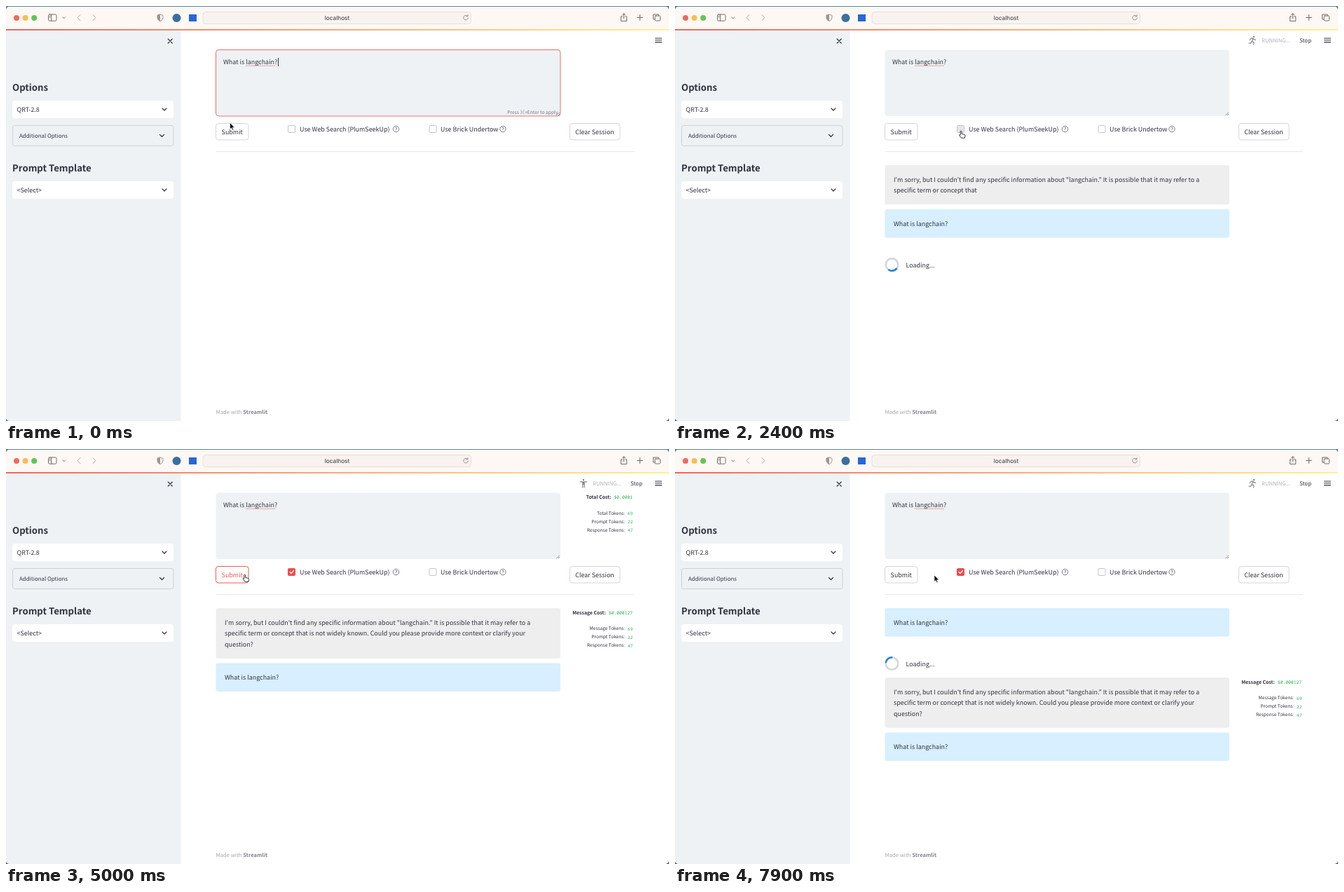
These frames come from a looping animation (946 by 592 pixels, 8000 ms). An HTML page:

```html
<!DOCTYPE html>
<html lang="en">
<head>
<meta charset="utf-8">
<title>Chat demo</title>
<style>
  html, body { margin: 0; width: 100%; height: 100%; overflow: hidden; background: #55575c; }
  svg { display: block; width: 946px; height: 592px; }
  text {
    font: 8.95px "Noto Sans CJK SC", "Noto Sans CJK JP", "Noto Sans", sans-serif;
    fill: #31333f; text-rendering: geometricPrecision; white-space: pre;
  }
  text.head { font-size: 13.2px; font-weight: 600; }
  text.small { font-size: 7.9px; }
  text.tiny { font-size: 6.5px; }
  text.cost { font-size: 6.9px; font-weight: 700; }
  text.code { font: 6.3px "Noto Sans Mono", "DejaVu Sans Mono", monospace; fill: #27b150; }
  text.mid { text-anchor: middle; }
  text.end { text-anchor: end; }
  .line { fill: none; stroke: #31333f; stroke-width: 1.2; stroke-linecap: round; stroke-linejoin: round; }
  .tool { fill: none; stroke: #706d6a; stroke-width: 1; stroke-linecap: round; stroke-linejoin: round; }
  .btn { fill: #fff; stroke: #d6d6d9; }
  .hover .btn { stroke: #ec5a55; }
  .hover text { fill: #ec5a55; }
  .box { fill: #fff; stroke: #c3c4c9; }
  .blue { fill: #d7effe; }
  .gray { fill: #eee; }
</style>
</head>
<body>
<svg viewBox="0 0 946 592">
  <defs>
    <linearGradient id="bar"><stop stop-color="#f4534e"/><stop offset="1" stop-color="#fdf08a"/></linearGradient>
    <clipPath id="win"><rect y="1" width="946" height="591" rx="5"/></clipPath>
    <g id="down"><path class="line" d="M-3-1.5L0 1.5L3-1.5"/></g>
    <g id="help"><circle r="4.2" fill="none" stroke="#6a6c76" stroke-width=".9"/><text class="tiny mid" y="2.4">?</text></g>
    <g id="question"><rect class="blue" x="299.5" width="491.5" height="40.5" rx="3"/><text x="312" y="23.7">What is langchain?</text></g>
  </defs>
  <rect width="946" height="2" fill="#5d8498"/>
  <g clip-path="url(#win)">
    <rect width="946" height="592" fill="#fff"/>
    <rect y="1" width="946" height="33" fill="#fdf8f4"/>
    <rect y="35" width="249.5" height="557" fill="#eef2f5"/>
    <rect y="33" width="946" height="1.8" fill="url(#bar)"/>

    <!-- browser toolbar -->
    <circle cx="15" cy="17" r="4" fill="#ed6a5f"/>
    <circle cx="27.6" cy="17" r="4" fill="#f5bf4f"/>
    <circle cx="40.2" cy="17" r="4" fill="#61c554"/>
    <rect class="tool" x="60.5" y="12" width="11.5" height="9.2" rx="1.6"/>
    <path class="tool" d="M64.6 12v9M62 14.2h1M62 16h1M81 16l1.8 1.8L84.600 16"/>
    <path class="tool" stroke-width="1.2" d="M106 12.500L102 16.600L106 20.700M124 12.500L128 16.600L124 20.700" style="stroke:#aaa6a3"/>
    <path class="tool" d="M220 12l4 1.400v3.400q0 3-4 5q-4-2-4-5v-3.400z" style="stroke:#99958f"/>
    <path d="M220 12l-4 1.400v3.400q0 3 4 5z" fill="#99958f"/>
    <circle cx="243.500" cy="17" r="6" fill="#3b6f9e"/>
    <rect x="261" y="12" width="11" height="10" fill="#2865d8"/>
    <rect x="281" y="8.500" width="382.500" height="17" rx="4" fill="#f8f3ef" stroke="#e5e0dc"/>
    <text class="mid" x="472.500" y="20" style="font:8.3px Inter,Roboto,sans-serif">localhost</text>
    <path class="tool" d="M658.600 14.500a3.300 3.300 0 1 0 .8 2.500M659 12.500v2.300h-2.300" style="stroke:#8a8683;stroke-width:.9"/>
    <path class="tool" d="M879.500 14.800h-2v6.700h8.200v-6.700h-2M881.600 18v-7M879.500 12.800l2.100-2.100l2.100 2.100M900.500 16.500h8M904.500 12.500v8M926 19h-2.500v-7h7.500v1.800"/>
    <rect class="tool" x="926" y="14" width="7.500" height="7" rx="1.200"/>

    <!-- sidebar -->
    <path class="line" d="M231.200 47l6 6M237.200 47l-6 6"/>
    <text class="head" x="9" y="121">Options</text>
    <rect x="9" y="135" width="230" height="25" rx="4" fill="#fff"/>
    <text x="15.500" y="151">QRT-2.8</text>
    <use href="#down" x="226" y="147.500"/>
    <rect x="9.500" y="170.500" width="229.500" height="29" rx="3" fill="none" stroke="#cdd1d6"/>
    <text class="small" x="19" y="188">Additional Options</text>
    <use href="#down" x="222.500" y="185"/>
    <text class="head" x="9" y="236">Prompt Template</text>
    <rect x="9" y="250" width="230" height="25" rx="4" fill="#fff"/>
    <text x="15.500" y="266.300">&lt;Select&gt;</text>
    <use href="#down" x="226" y="262.500"/>

    <!-- input area -->
    <path class="line" d="M926.500 46h9M926.500 48.800h9M926.500 51.600h9" style="stroke-width:1.100"/>
    <rect id="area" x="299.500" y="62.500" width="491.500" height="94.500" rx="4" fill="#eef2f5"/>
    <text x="310" y="83.400">What is langchain?</text>
    <path d="M342.500 85.300h42" stroke="#e0605c" stroke-width="1.100" stroke-dasharray="1.200 1"/>
    <path d="M785.500 156l4.500-4.500M788 156l2-2" stroke="#777" stroke-width=".8"/>
    <g id="focus">
      <path d="M388.500 74v12" stroke="#31333f"/>
      <text class="end" x="787.500" y="154.300" style="font-size:6.700px;fill:#777a84">Press ⌘+Enter to apply</text>
    </g>
    <g id="submit"><rect class="btn" x="299.500" y="167.500" width="46.500" height="23.500" rx="3.500"/><text class="mid" x="322.800" y="182.500">Submit</text></g>
    <rect id="check" class="box" x="402.500" y="170.500" width="10" height="10" rx="1.500"/>
    <path id="tick" class="line" d="M405 175.500l2 2l3.300-4" style="stroke:#fff"/>
    <text x="419" y="179.200">Use Web Search (PlumSeekUp)</text>
    <use href="#help" x="556.500" y="175.500"/>
    <rect class="box" x="604" y="170.500" width="10" height="10" rx="1.500"/>
    <text x="620" y="179.200">Use Brick Undertow</text>
    <use href="#help" x="709" y="175.500"/>
    <rect class="btn" x="804.500" y="167.500" width="71.500" height="23.500" rx="3.500"/>
    <text class="mid" x="840" y="182.500">Clear Session</text>
    <path d="M299.500 207.700h596.500" stroke="#e6e6e9"/>

    <!-- conversation -->
    <g id="answer">
      <rect id="bubble" class="gray" x="299.500" width="491.500" rx="3"/>
      <text class="row" x="312" y="23.700"></text>
      <text class="row" x="312" y="39.400"></text>
      <text class="row" x="312" y="55.100"></text>
    </g>
    <use id="asked" href="#question"/>
    <use id="askedNew" href="#question" y="227"/>
    <g id="loading">
      <circle cx="309.500" r="8.800" fill="none" stroke="#d6d6d9" stroke-width="2.600"/>
      <path id="arc" d="M6.220-6.220A8.800 8.800 0 0 1 6.220 6.220" fill="none" stroke="#2482dc" stroke-width="2.600"/>
      <text x="329.500" y="3.600">Loading...</text>
    </g>
    <g id="total"></g>
    <g id="message"></g>

    <g id="running">
      <path id="pose" class="line" transform="translate(824 49)" style="stroke:#85878f"/>
      <text x="837" y="52" style="font-size:7.700px;fill:#b1b2b8">RUNNING...</text>
      <text class="small" x="891" y="52">Stop</text>
    </g>
    <text x="299.500" y="582" style="font-size:7.650px;fill:#a5a6ac">Made with <tspan font-weight="600" fill="#85868e">Streamlit</tspan></text>
    <path id="cursor"/>
  </g>
</svg>
<script>
const $ = id => document.getElementById(id);
const show = (id, on) => $(id).style.display = on ? '' : 'none';
const move = (id, x, y) => $(id).setAttribute('transform', `translate(${x} ${y})`);

const LOOP = 8000, TOP = 227, ROW = 15.65;
const lines = [
  'I\'m sorry, but I couldn\'t find any specific information about "langchain." It is possible that it may refer to a',
  'specific term or concept that is not widely known. Could you please provide more context or clarify your',
  'question?'
].map(s => s.split(' '));
const rows = document.querySelectorAll('.row');

// time, x, y of the pointer tip
const track = [
  [0, 319.5, 166.5], [400, 324, 178], [700, 324, 178], [1300, 407, 182.5], [1500, 408, 178.3],
  [4200, 408, 178.3], [4700, 340.5, 179.3], [5000, 340.5, 179.3], [5600, 345.5, 181.3], [6200, 370, 180], [LOOP, 370, 180]
];
const ARROW = 'M0 0V9.2L2.1 7.3L3.5 10.6L5 10L3.6 6.8H6.5Z';
const HAND = 'M-.8 .8a.9 .9 0 0 1 1.8 0V4l4 1q1.2 .4 1 2L5.300 10H.5L-2.400 6q0-1.400 1.600-.2Z';

const head = (x, y) => `M${x - .6} ${y}a.6 .6 0 1 0 1.2 0a.6 .6 0 1 0-1.2 0`;
const poses = [
  head(0, -5) + 'M-4.800-2.200H4.800M0-2.200V1.500M-1.200-2V6M1.200-2V6',
  head(2, -5) + 'M1-2.800L-1 1.200L2 3L1.500 6M-1 1.200L-2.500 4.200H-5M-3.800-.5L-2-2.800H1L2.500-.8H4.500',
  head(3.5, -1) + 'M-3-5L1-4.500L-2-1.500L1 1M-5.500 2.500q1.800-1.500 3.600 0t3.600 0t3.600 0M-5.500 5.300q1.800-1.500 3.600 0t3.600 0t3.600 0'
];

function costs(title, price, kind, y) {
  const counts = [[kind, 69], ['Prompt', 22], ['Response', 47]];
  const edge = 894 - price.length * 3.8;
  return `<text class="cost end" x="${edge - 4}" y="${y}">${title} Cost:</text>
    <text class="code end" x="894" y="${y}">${price}</text>` +
    counts.map(([name, n], i) => `<text class="tiny end" x="883" y="${y + 22.8 + i * 12}">${name} Tokens:</text>
    <text class="code end" x="894.300" y="${y + 23 + i * 12}" style="font-size:6px">${n}</text>`).join('');
}
$('total').innerHTML = costs('Total', '$0.0001', 'Total', 70.8);
$('message').innerHTML = costs('Message', '$0.000127', 'Message', 8.6);

function pointer(t) {
  const i = track.findIndex(p => p[0] > t);
  const [a, b] = [track[i - 1], track[i]], k = (t - a[0]) / (b[0] - a[0]);
  return [a[1] + (b[1] - a[1]) * k, a[2] + (b[2] - a[2]) * k];
}

function conversation(t) {
  const again = t >= 5200, waiting = t >= 900 && t < 3200 || again;
  let left = t >= 3200 ? 99 : Math.max(0, Math.floor((t - 1400) / 40)), used = 0;
  lines.forEach((words, i) => {
    rows[i].textContent = words.slice(0, left).join(' ');
    if (left > 0) used++;
    left -= words.length;
  });
  const top = again ? TOP + 99 : TOP, height = 24.85 + used * ROW;
  const askedY = used ? top + height + 6.8 : top;
  show('answer', used);
  move('answer', 0, top);
  $('bubble').setAttribute('height', height);
  show('asked', t >= 900);
  move('asked', 0, askedY);
  show('askedNew', again);
  show('loading', waiting);
  move('loading', 0, (again ? TOP : askedY) + 79);
  const angle = 45 + (t - 1300) * .36 + (again ? -31 : 0);
  $('arc').setAttribute('transform', `translate(309.500 0) rotate(${angle})`);
  show('message', t >= 3200);
  move('message', 0, top);
  show('total', t >= 3200 && !again);
}

function draw(t) {
  const focused = t < 700, checked = t >= 4200;
  show('focus', focused);
  $('area').setAttribute('stroke', focused ? '#ee6c67' : 'none');

  const [x, y] = pointer(t);
  const onSubmit = x > 300 && x < 347 && y > 168 && y < 191;
  const onCheck = x > 402 && x < 550 && y > 169 && y < 182;
  const hand = onSubmit || onCheck, cursor = $('cursor');
  cursor.setAttribute('d', hand ? HAND : ARROW);
  cursor.setAttribute('fill', hand ? '#fff' : '#000');
  cursor.setAttribute('stroke', hand ? '#222' : '#fff');
  cursor.setAttribute('stroke-width', hand ? .9 : .6);
  move('cursor', x, y);
  $('submit').setAttribute('class', onSubmit ? 'hover' : '');
  $('check').style.fill = checked ? '#f04b4b' : onCheck ? '#e6e7ea' : '';
  $('check').style.stroke = checked ? '#f04b4b' : '';
  show('tick', checked);

  show('running', t >= 700 && t < 3200 || t >= 4300 && t < 4700 || t >= 5000);
  $('pose').setAttribute('d', poses[Math.floor((t + 600) / 300) % 3]);
  conversation(t);
}

const start = performance.now();
function tick() {
  draw(Math.floor((performance.now() - start) % LOOP / 100) * 100);
  requestAnimationFrame(tick);
}
tick();
</script>
</body>
</html>
```
